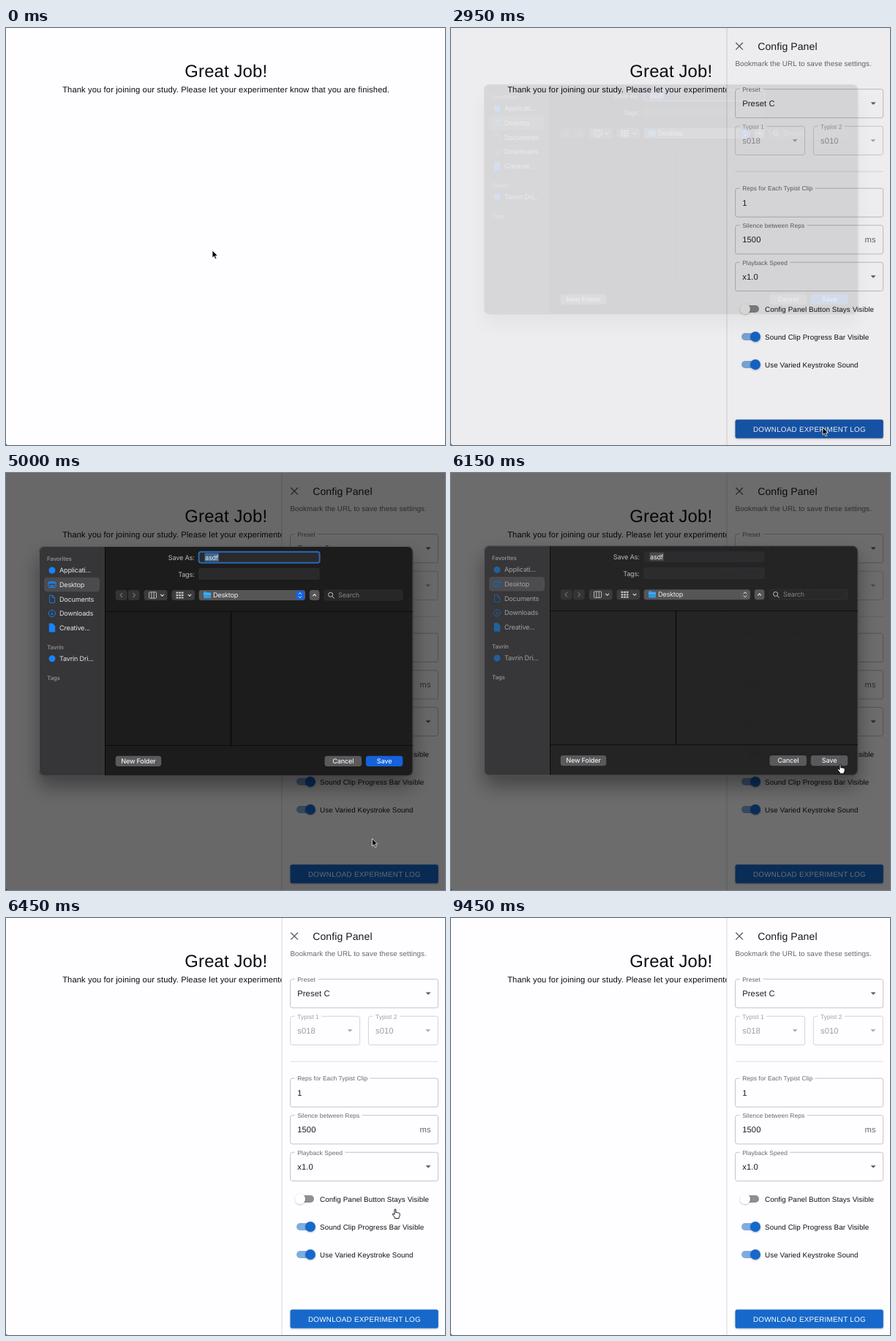
Recreate the animation shown at these times as an HTML page. Size 600 px wide and 570 px high, loop 9.75 s.

```html
<!DOCTYPE html>
<html lang="en">
<head>
<meta charset="utf-8">
<title>Download the experiment log</title>
<style>
html, body { margin: 0; width: 100%; height: 100%; overflow: hidden; background: #fefdff; }
svg { display: block; width: 600px; height: 570px; cursor: default; }
text { font-family: "Liberation Sans", Arial, sans-serif; letter-spacing: .01em; text-rendering: geometricPrecision; white-space: pre; }
.ui text { font-family: Inter, sans-serif; letter-spacing: -.022em; }
.caps { letter-spacing: .02857em; }
.h { letter-spacing: .0074em; }
#dialog { --icon: #1684f8; --label: #e6e5e7; --accent: #1462dc; --ring: #2b68b4; --sel: #41668f; --main: #1e1d1f; }
#dialog.idle { --icon: #20609f; --label: #a3a2a4; --accent: #5a595b; --ring: none; --sel: #49484a; --main: #212022; }
</style>
</head>
<body>
<svg id="stage" viewBox="0 0 600 570" xmlns="http://www.w3.org/2000/svg"></svg>
<script>
const LOOP = 9750, STEP = 50;
const WHITE = '#fefdff', BLUE = '#1769cb', HOVER = '#1959b0';

// ---- markup helpers
const text = (x, y, s, size, fill = '#111', attrs = '') =>
  `<text x="${x}" y="${y}" font-size="${size}" fill="${fill}" ${attrs}>${s}</text>`;
const rect = (x, y, w, h, fill, r = 0, attrs = '') =>
  `<rect x="${x}" y="${y}" width="${w}" height="${h}" rx="${r}" fill="${fill}" ${attrs}/>`;
const line = (d, stroke, w = 1, attrs = '') =>
  `<path d="${d}" fill="none" stroke="${stroke}" stroke-width="${w}" ${attrs}/>`;
const disc = (x, y, r, fill, attrs = '') =>
  `<circle cx="${x}" cy="${y}" r="${r}" fill="${fill}" ${attrs}/>`;
const mid = 'text-anchor="middle"', end = 'text-anchor="end"';

// ---- page and settings panel
function field(x, y, w, label, value, { arrow = true, off = false, unit = '' } = {}) {
  const ink = off ? '#9d9c9e' : '#1d1c1e';
  const tip = x + w - 13.5, my = y + 19.6;
  return rect(x, y, w, 39.2, 'none', 2.8, `stroke="${off ? '#c9c8ca' : '#b5b4b6'}" stroke-width=".8"`)
    + `<g class="label">${text(x + 9.6, y + 3.2, label, 8.4, off ? '#a09fa1' : '#666567')}</g>`
    + text(x + 9.6, my + 4, value, 11.2, ink)
    + (unit && text(x + w - 10, my + 4, unit, 11.2, '#666567', end))
    + (arrow ? `<path d="M${tip - 3.5} ${my - 1.6}h7l-3.5 3.5z" fill="${off ? '#acabad' : '#5c5b5d'}"/>` : '');
}

function toggle(y, label, on) {
  return rect(397, y - 4.9, 24, 9.8, on ? '#7facdf' : '#8f8e90', 4.9)
    + disc(on ? 416 : 402, y, 7, on ? BLUE : '#fff', 'filter="url(#soft)"')
    + text(429, y + 3.5, label, 9.8);
}

const page =
  text(300.8, 67, 'Great Job!', 23.8, '#0c0b0d', `class="h" ${mid}`)
  + text(300.6, 87.7, 'Thank you for joining our study. Please let your experimenter know that you are finished.', 11.19, '#0c0b0d', mid);

const gear = line('M0-7.2V7.2M-7.2 0H7.2M-5.1-5.1 5.1 5.1M-5.1 5.1 5.1-5.1', '#fff', 3)
  + disc(0, 0, 5.5, '#fff') + disc(0, 0, 2.5, BLUE);
const fab = `<g id="fab">${disc(569, 539.5, 19.6, BLUE, 'filter="url(#lift)"')}
  <g transform="translate(569 539.5)">${gear}</g></g>`;

const panel = `<g id="panel">
  ${rect(377, 0, 224, 570, WHITE)}${line('M377 0V570', '#d9d8da')}
  ${line('M389.3 20 398.9 29.6M398.9 20 389.3 29.6', '#59585a', 1.3)}
  ${text(419.2, 29.6, 'Config Panel', 14, '#1a191b', 'class="h"')}
  ${text(388.4, 52, 'Bookmark the URL to save these settings.', 9.8, '#666567')}
  ${field(388.6, 83.6, 202, 'Preset', 'Preset C')}
  ${field(388.6, 134.3, 95, 'Typist 1', 's018', { off: true })}
  ${field(495.4, 134.3, 95, 'Typist 2', 's010', { off: true })}
  ${line('M388.6 196.2H590.6', '#dddcde', .9)}
  ${field(388.6, 219.1, 202, 'Reps for Each Typist Clip', '1', { arrow: false })}
  ${field(388.6, 269.7, 202, 'Silence between Reps', '1500', { arrow: false, unit: 'ms' })}
  ${field(388.6, 320.3, 202, 'Playback Speed', 'x1.0')}
  ${toggle(384, 'Config Panel Button Stays Visible', false)}
  ${toggle(422, 'Sound Clip Progress Bar Visible', true)}
  ${toggle(460, 'Use Varied Keystroke Sound', true)}
  <g id="button">${rect(388.5, 535.3, 202.3, 25.4, BLUE, 2.8, 'id="face" filter="url(#soft)"')}
  ${text(489.9, 551.6, 'DOWNLOAD EXPERIMENT LOG', 9.8, '#fff', `class="caps" ${mid}`)}</g>
</g>`;

const shelf = `<g id="shelf" class="ui">
  ${rect(0, 532, 600, 40, WHITE)}${line('M0 532.5H600', '#d3d2d4')}
  ${rect(15.5, 546, 7.5, 11, '#c9c8ca', 1)}${line('M17 549h4.5M17 551.5h4.5M17 554h4.5', '#8c8b8d', .7)}
  ${disc(19.3, 552, 8.6, '#77767855', 'id="ring" stroke="#1b1a1c" stroke-width="1.5"')}
  ${text(33.7, 555.6, 'asdf.csv', 9.1, '#343335')}
  ${line('M146 553.6 149 550.6 152 553.6', '#59585a', 1.1)}
  ${line('M165.5 537V568', '#cdccce')}
  ${rect(519.5, 541.5, 57, 21, WHITE, 3, 'stroke="#d3d2d4"')}
  ${text(548, 555.2, 'Show All', 8.9, '#1f67c4', `font-weight="600" ${mid}`)}
  ${line('M586.2 548.8 592.4 555M592.4 548.8 586.2 555', '#59585a', 1.1)}
</g>`;

// ---- save dialog
const ICON = 'var(--icon)', LABEL = 'var(--label)';
const icons = {
  dot: y => disc(63, y, 4.5, ICON),
  desk: y => rect(58, y - 4, 10, 7.8, 'none', 1.2, `stroke="${ICON}"`) + rect(58, y - 3.6, 10, 2, ICON) + rect(60, y + 1, 6, 1.6, ICON),
  doc: y => line(`M59.6 ${y - 5}h4l3 3v7h-7zM63.4 ${y - 5}v3.2h3.2`, ICON, .9),
  down: y => disc(63, y, 4.6, 'none', `stroke="${ICON}" stroke-width=".9"`) + line(`M63 ${y - 2.5}v4.7m-2-2 2 2 2-2`, ICON, .9),
  file: y => `<path d="M58.8 ${y - 6}h5l3.4 3.4v8.6h-8.4z" fill="${ICON}"/>`
};
const item = (y, icon, label) => icons[icon](y) + text(73, y + 3.3, label, 9.1, LABEL);
const head = (y, label) => text(56, y + 2.8, label, 7.9, '#8b8a8c', 'font-weight="600"');
const push = (x, w, label, fill = '#5a595b') => rect(x, 386.8, w, 14.2, fill, 3.4)
  + text(x + w / 2, 397.1, label, 9.1, '#f0eff1', `font-weight="500" ${mid}`);
const tool = (x, w, fill = '#3b3a3c') => rect(x, 160, w, 14, fill, 3.4);
const chevron = x => line(`M${x - 2.3} 165.8l2.3 2.3 2.3-2.3`, '#dddcde', 1.1);
let cells = '';
for (let i = 0; i < 9; i++) cells += rect(232.5 + i % 3 * 3.6, 162.6 + Math.floor(i / 3) * 3.4, 2.8, 2.2, '#c9c8ca', .4);

const dialog = `<g id="dialog" class="ui">
  ${rect(45, 100, 511.5, 314.5, 'var(--main)', 8, 'filter="url(#drop)"')}
  <path d="M135 100H53a8 8 0 0 0-8 8V406.5a8 8 0 0 0 8 8H135z" fill="#363537"/>
  ${line('M135.5 100V414', '#0a090b')}
  ${rect(45.5, 100.5, 510.5, 313.5, 'none', 7.5, 'stroke="#605f61" stroke-width=".9"')}
  ${head(117.5, 'Favorites')}
  ${rect(52, 142.7, 76, 19.5, '#4b4a4c', 4)}
  ${item(133, 'dot', 'Applicati...')}${item(152.7, 'desk', 'Desktop')}
  ${item(172.3, 'doc', 'Documents')}${item(192, 'down', 'Downloads')}
  ${item(211.6, 'file', 'Creative...')}
  ${head(238, 'Tavrin')}${item(253.8, 'dot', 'Tavrin Dri...')}${head(280, 'Tags')}
  ${text(257.5, 118.7, 'Save As:', 9.1, '#bcbbbd', end)}${text(257.5, 141.7, 'Tags:', 9.1, '#bcbbbd', end)}
  ${rect(263.6, 107.8, 165, 15, '#2a292b', 3, 'stroke="var(--ring)" stroke-width="2"')}
  ${rect(271.5, 109.4, 19.5, 11.6, 'var(--sel)')}${text(272, 118.6, 'asdf', 9.1, '#f0eff1')}
  ${rect(264, 130.7, 164, 14.4, '#2a292b', 1.5, 'stroke="#383739" stroke-width=".7"')}
  ${tool(149.7, 15.8, '#333234')}${tool(166.8, 15.8, '#333234')}
  ${line('M159 164 156 167 159 170M173.5 164 176.5 167 173.5 170', '#717072', 1.1)}
  ${tool(188.6, 32)}${rect(195.5, 162.8, 10, 8.4, 'none', 1, 'stroke="#c9c8ca" stroke-width=".9"')}
  ${line('M198.8 163V171M202.2 163V171', '#c9c8ca', .9)}${chevron(213.5)}
  ${tool(226.5, 31.5)}${cells}${chevron(251)}
  ${tool(263.6, 145.4, '#565557')}
  <path d="M270 163q0-1 1-1h2.6l1.2 1.2h4.2q1 0 1 1v6q0 1-1 1h-8q-1 0-1-1z" fill="#2e9be6"/>
  ${line('M270 165.2H280', '#83c8f5', .8)}
  ${text(283, 170.3, 'Desktop', 9.1, '#f0eff1')}
  ${rect(396, 161.2, 11.8, 11.8, 'var(--accent)', 2.6)}
  ${line('M399.9 165.8 402 163.6 404.1 165.8M399.9 168.4 402 170.6 404.1 168.4', '#f0eff1', 1)}
  ${tool(414.8, 13.6, '#565557')}${line('M419.3 168.2 421.6 165.9 423.9 168.2', '#f0eff1', 1.1)}
  ${rect(435, 160, 107, 14, '#272628', 3, 'stroke="#343335" stroke-width=".7"')}
  ${disc(443.6, 166.3, 3, 'none', 'stroke="#c9c8ca"')}${line('M445.8 168.6 448.6 171.5', '#c9c8ca')}
  ${text(454, 170.3, 'Search', 9.1, '#858486')}
  ${line('M136 189.3H556M136 372.5H556', '#0c0b0d')}${line('M307.5 189.5V372', '#080709', 1.2)}
  ${push(149.7, 62.5, 'New Folder')}${push(435.5, 50.5, 'Cancel')}${push(491.8, 50.5, 'Save', 'var(--accent)')}
</g>`;

const cursors = `<g id="cursor">
  <path id="arrow" d="M0 0V10.2L2.4 8.1 4 11.9 5.8 11.1 4.2 7.4H7.4Z" fill="#000" stroke="#fff" stroke-width=".8"/>
  <path id="hand" d="M-1-1.2q1-1.2 1.9 0V3q1.2-.8 1.8.2 1.3-.6 1.8.4 1.5-.4 1.7 1V7q-.3 1.6-1.2 2.5V11H-.6V9.6Q-2.2 7.8-3.6 5.6-3.8 4-2.2 4.6L-1 5.8Z" fill="#fff" stroke="#000" stroke-width=".9"/>
</g>`;

const shadow = (id, dy, blur, alpha) =>
  `<filter id="${id}" x="-30%" y="-30%" width="160%" height="170%"><feDropShadow dx="0" dy="${dy}" stdDeviation="${blur}" flood-opacity="${alpha}"/></filter>`;

const stage = document.getElementById('stage');
stage.innerHTML = `<defs>${shadow('soft', .8, .9, .3)}${shadow('lift', 2.5, 2.2, .3)}${shadow('drop', 14, 13, .38)}</defs>
  ${rect(0, 0, 600, 570, WHITE)}${page}${fab}${panel}${shelf}
  ${rect(0, 0, 600, 570, '#000', 0, 'id="dim"')}${dialog}
  <path d="M0 568Q.2 569.8 2 570H0Z" fill="#000"/>${cursors}`;

// open a notch in each outline behind its label
for (const g of stage.querySelectorAll('.label')) {
  const t = g.firstChild, w = t.getComputedTextLength();
  g.insertAdjacentHTML('afterbegin', rect(+t.getAttribute('x') - 3.5, +t.getAttribute('y') - 6, w + 7, 7, WHITE));
}

// ---- motion
const parts = {};
for (const el of stage.querySelectorAll('[id]')) parts[el.id] = el;
const ramp = (t, from, to) => Math.min(1, Math.max(0, (t - from) / (to - from)));
const smooth = p => p * p * (3 - 2 * p);
const easeOut = p => 1 - (1 - p) ** 3;
const show = (el, on) => el.style.display = on ? '' : 'none';
const move = (el, x, y) => el.setAttribute('transform', `translate(${x} ${y})`);

// cursor stops: time, x, y
const path = [
  [100, 282, 304], [800, 568, 543], [1600, 568, 543], [2500, 508, 546], [3100, 508, 546],
  [3650, 494, 520], [4700, 494, 520], [5850, 532, 400], [7500, 532, 399],
  [8000, 583, 555], [9150, 583, 552], [9450, 602, 552]
];

function cursorAt(t) {
  let i = 1;
  while (i < path.length - 1 && t > path[i][0]) i++;
  const [a, b] = [path[i - 1], path[i]], p = smooth(ramp(t, a[0], b[0]));
  return [a[1] + (b[1] - a[1]) * p, a[2] + (b[2] - a[2]) * p];
}

function render(t) {
  const [cx, cy] = cursorAt(t);
  const open = easeOut(ramp(t, 1075, 1300));
  const sheet = smooth(ramp(t, 2890, 3175)) * (1 - smooth(ramp(t, 6120, 6405)));
  const bar = smooth(ramp(t, 6650, 6850)) * (1 - smooth(ramp(t, 8250, 8400)));

  show(parts.fab, t >= 950 && t < 1400);
  show(parts.panel, open > 0);
  move(parts.panel, 225 * (1 - open), 0);
  move(parts.button, 0, -39.7 * bar);
  const top = 535 - 39.7 * bar;
  const over = open === 1 && sheet < .5 && cx < 591 && cy > top && cy < top + 26;
  parts.face.setAttribute('fill', over ? HOVER : BLUE);

  show(parts.shelf, bar > 0);
  move(parts.shelf, 0, 39 * (1 - bar));
  parts.ring.setAttribute('opacity', ramp(t, 6850, 7100) * (1 - ramp(t, 7700, 8050)));

  show(parts.dim, sheet > 0);
  show(parts.dialog, sheet > 0);
  parts.dim.setAttribute('opacity', .59 * sheet);
  parts.dialog.setAttribute('opacity', sheet);
  parts.dialog.setAttribute('class', t >= 6100 ? 'ui idle' : 'ui');
  move(parts.dialog, 0, -26 * (1 - sheet));

  const hand = t >= 950 && t < 1200 || t >= 6100 && t < 6800;
  show(parts.hand, hand);
  show(parts.arrow, !hand);
  show(parts.cursor, t < 9450);
  move(parts.cursor, cx, cy);
}

const start = performance.now();
function tick() {
  const t = (performance.now() - start) % LOOP;
  render(Math.floor(t / STEP) * STEP);
  requestAnimationFrame(tick);
}
tick();
</script>
</body>
</html>
```
